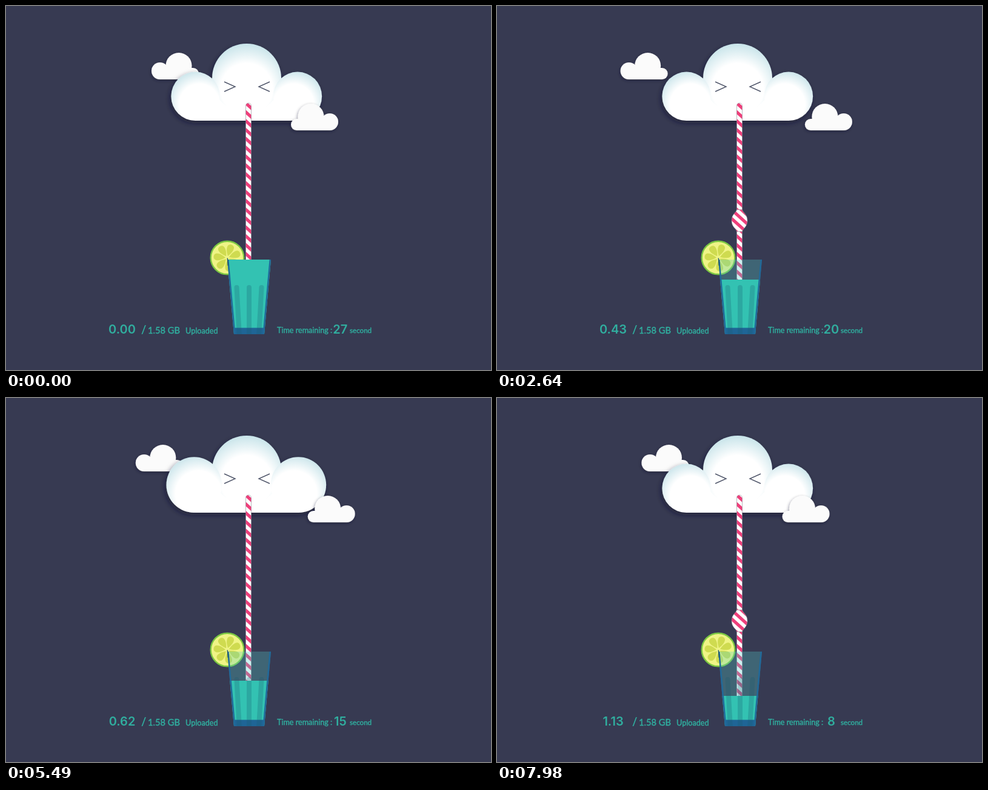
An HTML page that plays this animation: 800 px wide and 600 px high, repeating every 8000 ms.

```html
<!DOCTYPE html>
<html lang="en">
<head>
<meta charset="utf-8">
<title>Cloud upload</title>
<style>
  html, body { margin: 0; width: 100%; height: 100%; overflow: hidden; background: #373a52; }
  svg { display: block; width: 100vw; height: 100vh; }
  text { fill: #30ae9f; font-family: Lato, "Open Sans", sans-serif; }
  .small { stroke: #30ae9f; stroke-width: .4; }
  .num { font: 600 20px Inter, "Noto Sans", sans-serif; text-anchor: middle; }
</style>
</head>
<body>
<svg viewBox="0 0 800 600">
  <defs>
    <radialGradient id="headFill" gradientUnits="userSpaceOnUse" cx="397" cy="137" r="76">
      <stop offset=".56" stop-color="#fff"/><stop offset="1" stop-color="#c6e3e9"/>
    </radialGradient>
    <radialGradient id="leftFill" cx=".58" cy=".66" r=".69">
      <stop offset=".6" stop-color="#fff"/><stop offset="1" stop-color="#cbe5eb"/>
    </radialGradient>
    <radialGradient id="rightFill" cx=".42" cy=".66" r=".69">
      <stop offset=".6" stop-color="#fff"/><stop offset="1" stop-color="#cbe5eb"/>
    </radialGradient>
    <pattern id="stripes" patternUnits="userSpaceOnUse" width="40" height="14.6" patternTransform="translate(0 5) skewY(42)">
      <rect width="40" height="14.6" fill="#fff"/>
      <rect width="40" height="7" fill="#ee3f7b"/>
    </pattern>
    <filter id="shadow" x="-20%" y="-20%" width="140%" height="150%">
      <feDropShadow dx="-2" dy="4" stdDeviation="4" flood-color="#14162a" flood-opacity=".6"/>
    </filter>
    <filter id="softShadow" x="-20%" y="-20%" width="140%" height="150%">
      <feDropShadow dx="-1" dy="2" stdDeviation="2.5" flood-color="#14162a" flood-opacity=".45"/>
    </filter>
    <clipPath id="aboveDrink"><rect id="dry" width="800" height="418"/></clipPath>
    <clipPath id="cup"><path d="M365 418H437L426 541H376Z"/></clipPath>
    <g id="puffy" fill="#fbfbfb">
      <circle cx="14" cy="30" r="14"/>
      <circle cx="45" cy="21.5" r="21.5"/>
      <circle cx="68.5" cy="34.5" r="9.5"/>
      <rect x="14" y="25" width="54.5" height="19"/>
    </g>
  </defs>

  <rect width="800" height="600" fill="#373a52"/>
  <g id="cloudL" filter="url(#softShadow)"><use href="#puffy"/></g>

  <g filter="url(#shadow)">
    <path d="M312 189V160L345 140H450L482 160V189Z" fill="#fff"/>
    <circle cx="397" cy="119" r="57" fill="url(#headFill)"/>
    <circle id="lobeL" fill="url(#leftFill)"/>
    <circle id="lobeR" fill="url(#rightFill)"/>
  </g>
  <path d="M360 125L378 133L360 141M435 125L417 133L435 141" fill="none" stroke="#50566a" stroke-width="1.4"/>
  <g id="cloudR" filter="url(#softShadow)"><use href="#puffy" transform="matrix(-1 0 0 1 78 0)"/></g>

  <g id="lime">
    <circle cx="365" cy="415" r="27.3" fill="#eff486" stroke="#7bc742" stroke-width="2.4"/>
  </g>

  <g clip-path="url(#aboveDrink)" fill="url(#stripes)" stroke="#8d8794" stroke-width=".6">
    <rect x="395.5" y="160" width="9" height="400" rx="4.5"/>
    <path id="bulge" d="M-4.5-18C-6-12.5-13-10.5-13 0S-6 12.5-4.5 18H4.5C6 12.5 13 10.5 13 0S6-12.5 4.5-18Z"/>
  </g>

  <g clip-path="url(#cup)">
    <rect x="360" y="418" width="80" height="123" fill="#53cfcb" fill-opacity=".29"/>
    <rect id="drink" x="360" width="80" fill="#33c2b2"/>
    <rect x="360" y="530.5" width="80" height="11" fill="#1f6596"/>
    <path d="M380.5 464L385 545M401 464V545M421.5 464L417 545" stroke="#195a6e" stroke-opacity=".25" stroke-width="8" stroke-linecap="round"/>
    <path d="M365 418L376 541M437 418L426 541" stroke="#20699a" stroke-width="5"/>
  </g>
  <path d="M365.3 415.5L366.3 428" stroke="#245a6c" stroke-width="1.5"/>

  <text id="done" class="num" x="191.5" y="540"></text>
  <text x="223" y="540" font-size="18" font-weight="700">/</text>
  <text class="small" x="234" y="540" font-size="14.7">1.58 GB</text>
  <text class="small" x="296" y="539.5" font-size="12.7">Uploaded</text>
  <text class="small" x="447" y="539" font-size="12.6">Time remaining :</text>
  <text id="left" class="num" x="551.3" y="539.5"></text>
  <text class="small" x="567" y="539" font-size="11.6">second</text>
</svg>
<script>
const LOOP = 8000, SIP = 1800;
const LEVELS = [418, 429, 451, 466, 475, 491];
const UPLOADED = [0, .21, .43, .62, .95, 1.13];
const SECONDS = [27, 23, 20, 15, 12, 8];

const $ = id => document.getElementById(id);
const clamp = v => Math.min(1, Math.max(0, v));
const ramp = (t, a, b) => clamp((t - a) / (b - a));
const set = (id, attrs) => {
  for (const k in attrs) $(id).setAttribute(k, attrs[k]);
};
const moveTo = (id, x, y, s = 1) =>
  set(id, { transform: `translate(${x} ${y}) scale(${s})` });

// 0 to 1 over the first 2400 ms, then back to 0 by the end of the period
function drift(t, period) {
  const d = t % period;
  return d < 2400 ? d / 2400 : (period - d) / (period - 2400);
}

for (let i = 0; i < 7; i++) {
  const petal = document.createElementNS("http://www.w3.org/2000/svg", "path");
  petal.setAttribute("d", "M3 0C9-4 13-6 18-5.6C24-5 24 5 18 5.6C13 6 9 4 3 0Z");
  petal.setAttribute("fill", "#cfdb50");
  petal.setAttribute("transform", `translate(365 415) rotate(${i * 360 / 7 - 72})`);
  $("lime").append(petal);
}

function draw(t) {
  const n = Math.floor(t / SIP), m = t % SIP;
  const between = (list, p) => list[n] + (list[n + 1] - list[n]) * p;

  moveTo("cloudL", 240 - 42.7 * drift(t, 4020), 77);
  moveTo("cloudR", 470 + 44.6 * drift(t, 4000), 161);

  // a swallow swells the lobes and runs into the next sip
  const since = m < 450 && n > 0 ? m + SIP : m;
  const puff = Math.sin(Math.PI * ramp(since, 1600, 2250));
  const r = 40.2 + 5.7 * puff;
  set("lobeL", { cx: 312.6 - 2.3 * puff, cy: 189 - r, r });
  set("lobeR", { cx: 480.9 + 1.4 * puff, cy: 189 - r, r });

  const y = 545 - .2275 * m;
  moveTo("bulge", 400, y, ramp(y, 162, 192));
  $("bulge").style.display = y > 163 ? "" : "none";

  const p = ramp(m, 90, 420);
  const level = between(LEVELS, p * p * (3 - 2 * p));
  set("dry", { height: level });
  set("drink", { y: level, height: 541 - level });

  const count = ramp(m, 435, 780);
  $("done").textContent = between(UPLOADED, count).toFixed(2);
  $("left").textContent = Math.round(between(SECONDS, count));
}

const start = performance.now();
function tick() {
  draw((performance.now() - start) % LOOP);
  requestAnimationFrame(tick);
}
tick();
</script>
</body>
</html>
```
